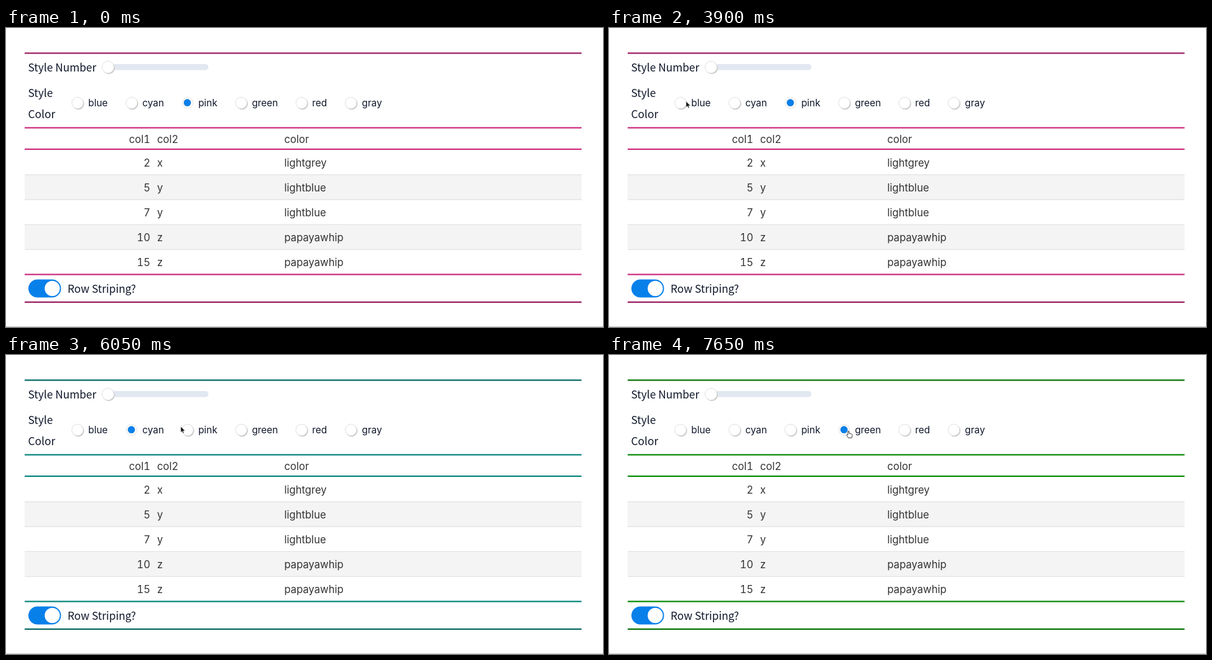
An HTML page that plays this animation: 960 by 481 pixels, repeating every 8000 ms.

```html
<!DOCTYPE html>
<html lang="en">
<head>
<meta charset="utf-8">
<title>Table styling controls</title>
<style>
  html, body { margin: 0; width: 100%; height: 100%; overflow: hidden; background: #fff; }
  svg { display: block; width: 960px; height: 481px; }
  text { white-space: pre; }
  .label { font: 17.3px "Noto Sans CJK JP", "Noto Sans CJK SC", "Noto Sans CJK", Lato, sans-serif; fill: #0f172a; }
  .option { font: 15.4px Inter, Roboto, sans-serif; fill: #0f172a; }
  .cell { font: 16.6px Inter, Roboto, sans-serif; font-variant-numeric: tabular-nums; fill: #333; }
  .knob { fill: #fff; stroke: #e0e0e0; stroke-width: 1; }
  .shade { fill: #c9c9c9; }
</style>
</head>
<body>
<svg id="stage" viewBox="0 0 960 481" xmlns="http://www.w3.org/2000/svg"></svg>
<script>
const LOOP = 8000, STEP = 50;
const BLUE = '#0880ea';
const stage = document.getElementById('stage');

function add(tag, attrs, parent = stage) {
  const el = document.createElementNS('http://www.w3.org/2000/svg', tag);
  for (const key in attrs) el.setAttribute(key, attrs[key]);
  parent.append(el);
  return el;
}
const rect = (x, y, width, height, fill, rx = 0, parent) =>
  add('rect', { x, y, width, height, fill, rx }, parent);
const circle = (cx, cy, r, attrs, parent) => add('circle', { cx, cy, r, ...attrs }, parent);
function text(str, x, y, kind, anchor = 'start', parent) {
  add('text', { x, y, class: kind, 'text-anchor': anchor }, parent).textContent = str;
}
const show = (el, on) => el.setAttribute('visibility', on ? 'visible' : 'hidden');

// Table
const rows = [[2, 'x', 'lightgrey'], [5, 'y', 'lightblue'], [7, 'y', 'lightblue'],
  [10, 'z', 'papayawhip'], [15, 'z', 'papayawhip']];
function tableRow([a, b, c], y) {
  text(a, 232, y, 'cell', 'end');
  text(b, 243, y, 'cell');
  text(c, 447.5, y, 'cell');
}
tableRow(['col1', 'col2', 'color'], 184.5);
rows.forEach((row, i) => {
  const top = 196 + 40.1 * i;
  if (i % 2) rect(30, top, 895.5, 40.1, '#f4f4f4');
  if (i) rect(30, top - 0.7, 895.5, 1.2, '#e0e0e0');
  tableRow(row, 222.6 + 40 * i);
});
const outer = [40.5, 441].map(y => rect(30, y - 1.1, 895.5, 2.2));
const inner = [160.5, 195, 396.5].map(y => rect(30, y - 1.1, 895.5, 2.2));
rect(0, 480, 960, 1, '#c8c8c8');

// Slider
text('Style Number', 35.5, 70, 'label');
rect(156, 58, 169.5, 9.8, '#e2e8f0', 4.9);
const thumbShade = circle(165.2, 64.4, 9.8, { class: 'shade' });
circle(164, 63, 9.6, { class: 'knob' });

// Radio buttons
text('Style', 35.5, 111, 'label');
text('Color', 35.5, 144.5, 'label');
const themes = {
  blue: ['#004d80', '#0076ba'], cyan: ['#016763', '#01837b'],
  pink: ['#99195f', '#cb2a7b'], green: ['#027101', '#038901'], red: [], gray: []
};
const radioX = [115, 202, 292, 378.3, 475.3, 554.6];
const labelX = [132.3, 219.3, 309.2, 395.4, 492.2, 572.3];
const radios = Object.keys(themes).map((name, i) => {
  const x = radioX[i];
  const shade = circle(x + 1.2, 121.8, 9.5, { class: 'shade' });
  const ring = circle(x, 120.5, 9.2, { class: 'knob' });
  const dot = circle(x - 0.4, 120.2, 5.6, { fill: BLUE, stroke: '#1b70bd', 'stroke-width': 0.5 });
  text(name, labelX[i], 126.4, 'option');
  return { name, shade, ring, dot };
});

// Switch
rect(36, 404.5, 52.5, 29, BLUE, 14.5);
circle(74.4, 419, 12.2, { fill: '#fff' });
text('Row Striping?', 99, 426, 'label');

// Slider value tip
const tip = add('g', {});
rect(141.5, 12.5, 46, 36, '#00000018', 7, tip);
add('rect', { x: 142.5, y: 11.5, width: 44, height: 35, rx: 6, fill: '#fff', stroke: '#dfe3e8' }, tip);
text('1', 164.5, 34.5, 'option', 'middle', tip);

// Pointers, both anchored at their tip
const pointer = add('g', {});
const arrow = add('path', { d: 'M0 0V9.6L2.2 7.6 3.7 11 5.2 10.3 3.8 7.1H6.8Z',
  fill: '#111', stroke: '#fff', 'stroke-width': 0.5 }, pointer);
const hand = add('path', { d: 'M-1 1Q0-.5 1 1V4.3Q2 3.5 3 4.6 4.2 4 4.8 5.2 6 4.8 6 6.4V8.4Q6 10 5 11.3H0L-2.8 7.6Q-3-.8 5.6-1 6.4Z',
  fill: '#fff', stroke: '#222', 'stroke-width': 0.9, 'stroke-linejoin': 'round' }, pointer);
hand.setAttribute('d', 'M-1 1Q0-.5 1 1V4.3Q2 3.5 3 4.6Q4.2 4 4.8 5.2Q6 4.8 6 6.4V8.4Q6 10 5 11.3H0L-2.8 7.6Q-2.8 5.6-1 6.4Z');

// time, x, y
const path = [
  [1600, 35, 57], [1700, 79, 66], [1850, 79, 66], [2050, 158, 62], [2250, 158, 62],
  [2400, 162, 64], [2750, 168, 65.5], [3500, 168, 65.5], [3600, 165, 65.5], [3700, 165, 65.5],
  [3900, 124, 118], [4150, 117, 123], [4300, 115, 124], [4900, 115, 124],
  [5150, 150, 118], [5400, 200, 119], [5500, 204, 121], [5750, 204, 121],
  [6050, 281, 115], [6250, 290, 118], [6400, 293, 119], [6600, 293, 119],
  [6900, 332, 113], [7200, 378, 119], [7350, 385, 122], [8000, 385, 122]
];
const handSpans = [[2350, 3750], [3950, 5000], [5350, 5850], [6150, 6700], [7150, 8000]];
const clicks = [[0, 'pink'], [4300, 'blue'], [5650, 'cyan'], [6500, 'pink'], [7500, 'green']];

function place(t) {
  const i = path.findIndex(p => p[0] > t);
  const [t0, x0, y0] = path[i - 1], [t1, x1, y1] = path[i];
  const k = (t - t0) / (t1 - t0);
  return [x0 + (x1 - x0) * k, y0 + (y1 - y0) * k];
}

function draw(t) {
  const chosen = clicks.filter(c => c[0] <= t).pop()[1];
  const [dark, bright] = themes[chosen];
  outer.forEach(line => line.setAttribute('fill', dark));
  inner.forEach(line => line.setAttribute('fill', bright));
  for (const { name, shade, ring, dot } of radios) {
    const on = name === chosen;
    show(dot, on);
    show(shade, !on);
    ring.setAttribute('r', on ? 8.7 : 9.2);
  }

  const pressed = t >= 2900 && t < 3200;
  thumbShade.setAttribute('cx', pressed ? 168 : 165.2);
  thumbShade.setAttribute('cy', pressed ? 67 : 64.4);
  const fadeIn = (t - 2850) / 150, fadeOut = (3850 - t) / 100;
  tip.setAttribute('opacity', Math.max(0, Math.min(1, fadeIn, fadeOut)));

  const seen = t >= path[0][0];
  const pointing = handSpans.some(([from, to]) => t >= from && t < to);
  show(arrow, seen && !pointing);
  show(hand, seen && pointing);
  if (seen) pointer.setAttribute('transform', `translate(${place(t)})`);
}

const start = performance.now();
function tick() {
  const t = (performance.now() - start) % LOOP;
  draw(Math.floor(t / STEP) * STEP);
  requestAnimationFrame(tick);
}
tick();
</script>
</body>
</html>
```
